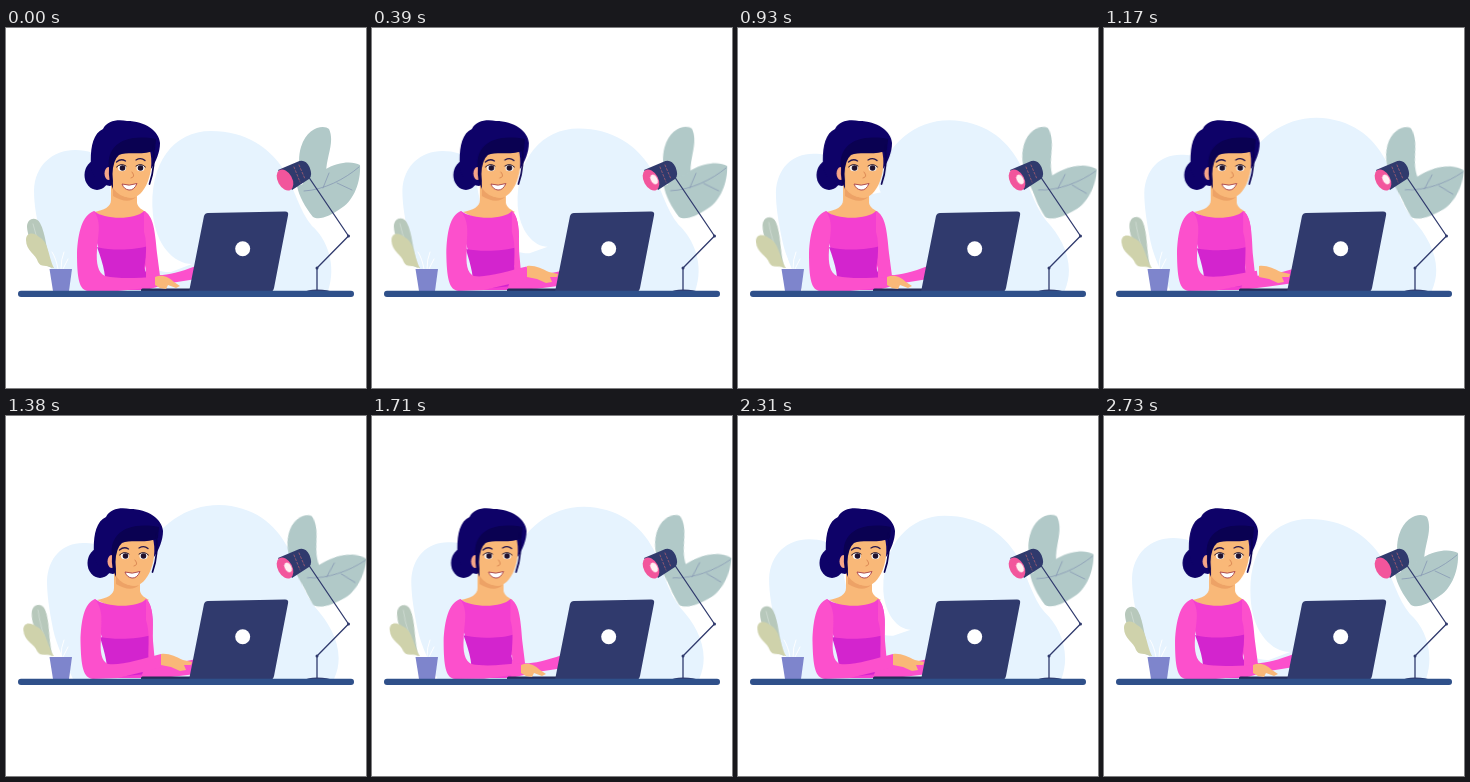
An HTML page that plays this animation: 360x360 px, repeating every 2.76 s.

```html
<!DOCTYPE html>
<html lang="en">
<head>
<meta charset="utf-8">
<title>Typing at a desk</title>
<style>
  html, body { margin: 0; width: 100%; height: 100%; overflow: hidden; background: #fff; }
  svg { display: block; width: 100vw; height: 100vh; }

  /* --b is the far pose of a path; plants and backdrop drift slowly, the woman types */
  .drift, .swing { animation: 1380ms cubic-bezier(.37, 0, .63, 1) infinite alternate; }
  .type, .nod { animation: 460ms cubic-bezier(.37, 0, .63, 1) infinite alternate; }
  .drift, .type { animation-name: morph; }
  .swing { animation-name: swing; }
  .nod { animation-name: nod; }
  .bulb { animation: glow 2760ms linear infinite; }
  @keyframes morph { to { d: var(--b); } }
  @keyframes swing { to { transform: rotate(var(--turn)); } }
  @keyframes nod { to { transform: translateX(3px); } }
  @keyframes glow { 0%, 4%, 98%, 100% { opacity: 0; } 12%, 88% { opacity: 1; } }

  .right { transform-origin: 310px 190px; }
  .left { transform-origin: 48px 243px; }
  .sky { fill: #e6f3fe; }
  .navy { fill: #303a6d; }
  .hair { fill: #0e0268; }
  .fringe { fill: #0a0152; }
  .skin { fill: #f9b878; }
  .sleeve { fill: #fc50cc; }
  .line { fill: none; stroke-linecap: round; stroke-linejoin: round; }
</style>
</head>
<body>
<svg viewBox="0 0 360 360">
  <path class="sky drift"
    d="M57 263C48 247 40 232 36 213C31 193 28 178 28 162C29 137 47 122 69 122C82 122 91 125 104 136C100 190 130 246 165 244L186 236C168 236 150 217 147 187C142 135 168 103 205 103C240 103 264 120 278 142C288 160 294 184 306 198C321 211 331 237 322 263L192 263L100 263Z"
    style="--b:path('M67 263C60 247 51 232 47 213C43 193 41 178 41 165C42 142 56 127 77 127C86 127 94 128 104 136C110 140 118 142 124 142L130 142C134 142 137 141 140 138C151 110 180 89 213 89C247 90 269 107 282 132C291 153 296 175 309 191C327 211 340 237 328 263L192 263L100 263Z')"/>

  <g class="swing right" style="--turn:-11deg">
    <path fill="#b1c9c8" d="M309 190C302 167 288 142 295 119C301 99 318 96 323 101C330 116 317 134 321 151Z"/>
  </g>
  <g class="swing right" style="--turn:7deg">
    <path fill="#b1c9c8" d="M291 158C301 156 308 148 318 142C333 133 347 133 354 137C355 155 347 174 334 181C325 187 314 193 307 189C299 179 293 168 291 158Z"/>
    <path class="line" stroke="#8799b4" stroke-width=".8" d="M298 163C318 162 339 151 353 139M317 160L323 145M331 155L346 162"/>
  </g>

  <g class="swing left" style="--turn:6deg">
    <path fill="#b7c8bb" d="M41 238C36 226 22 216 21 199C21 190 30 188 34 195C40 206 40 222 46 240Z"/>
    <path class="line" stroke="#d8e3dc" stroke-width=".6" d="M27 196Q32 217 44 238"/>
  </g>
  <g class="swing left" style="--turn:-5deg">
    <path fill="#cfd2ab" d="M47 240C40 236 35 240 32 234C30 226 20 223 20 212C20 204 28 204 33 209C43 214 42 228 48 240Z"/>
  </g>
  <path class="line" stroke="#fff" stroke-width=".9" d="M52 241Q50 230 46 224M55 241Q55 231 58 224M57 241L62 231"/>
  <path fill="#7e85cc" d="M43.500 241H66L63 263H47Z"/>

  <path class="line" stroke="#303a6d" stroke-width="1.300" d="M311 264V240L342.500 208L302 148"/>
  <circle class="navy" cx="311" cy="240" r="1.500"/>
  <circle class="navy" cx="342.500" cy="208" r="1.500"/>
  <path class="navy" d="M299 264Q301 261.500 311 261.500Q323 261.500 326 264Z"/>
  <path class="navy" d="M272 142L291 134Q299 130 303.500 139Q307 148 303 151L286 162Z"/>
  <path class="line" stroke="#9a5b70" stroke-width=".9" stroke-dasharray="2 2" d="M288 139L294 154M293 137L299 151"/>
  <g transform="rotate(-29 279 152)">
    <ellipse cx="279" cy="152" rx="7.200" ry="11.300" fill="#f2559c"/>
    <ellipse class="bulb" cx="282" cy="153" rx="3.300" ry="5.300" fill="#fff0f2"/>
  </g>

  <g class="nod">
    <ellipse class="hair" cx="91" cy="147" rx="12.500" ry="15"/>
    <path class="hair" d="M85 140C84 122 86 106 97 101C101 92 113 91 121 93C139 93 153 103 154 115C154 124 150 134 145 141L104 158Q89 156 85 140Z"/>
    <path class="skin" d="M105 153L131 163V175C132 180 137 182 140 184L115 197L88 184C98 182 105 179 105 172Z"/>
    <path fill="#eda266" d="M107 160Q115 172 130 169Q122 177 107 168Z"/>
    <ellipse cx="102.500" cy="145.500" rx="4" ry="6.500" fill="#f6a588"/>
    <path class="skin" d="M106 129C115 119 132 122 142 117C147 128 146 143 142 153C138 164 131 170 125 170C115 169 106 160 106 147Z"/>
    <path class="fringe" d="M103 140C100 118 118 105 150 111L149 122C139 128 122 123 113 127Q107 132 106.500 146Q107 154 107 161Q102 152 103 140Z"/>
    <path class="line" stroke="#0a0152" stroke-width="1.700" d="M147 117C149 131 147 146 143.500 156"/>
    <path class="line" stroke="#24164e" stroke-width="1.300" d="M110.500 134Q115 130 119.500 133M130 132Q135 129 139 132.500"/>
    <g fill="#fff">
      <ellipse cx="116" cy="140" rx="4" ry="3.300"/>
      <ellipse cx="134.500" cy="140" rx="4" ry="3.300"/>
    </g>
    <g fill="#21122d">
      <circle cx="116.500" cy="140" r="2.800"/>
      <circle cx="134.500" cy="140" r="2.800"/>
    </g>
    <path class="line" stroke="#21122d" d="M110.500 139Q115 134.500 120 138M130 138Q135 134.500 139.500 139"/>
    <path class="line" stroke="#dc8954" d="M126 144Q130 149 125 150"/>
    <path fill="#fff" stroke="#a8414a" stroke-width=".9" d="M116 156Q123 158.500 131 155.500Q128 162.500 123 162Q118 161.500 116 156Z"/>
  </g>

  <path class="type" fill="#f33fd0"
    d="M88 183C98 192 130 192 138 183C147 189 149 205 146 220L139 240L140 262L100 262C105 245 95 230 91 215L80 205Z"
    style="--b:path('M89 183C100 192 133 192 140 183C147 189 148 205 146 220L142 240L142 262L102 262C107 245 98 230 94 215L84 205Z')"/>
  <path class="type" fill="#d324ce"
    d="M91 219C106 223 130 222 142 218L138 240Q142 250 150 257L98 262C101 251 98 238 91 219Z"
    style="--b:path('M94 221C109 224 133 223 146 219L143 238Q144 250 150 257L100 262C103 251 99 238 94 221Z')"/>
  <path class="sleeve type"
    d="M138 183C147 187 149 201 151 225L154 248L141 249C137 235 143 219 138 204Z"
    style="--b:path('M140 183C146 187 147 201 147 225L149 247L143 249C141 235 145 219 140 204Z')"/>
  <path class="sleeve type"
    d="M140 244C150 250 166 247 190 238L190 251L165 255L140 262Z"
    style="--b:path('M140 246C150 250 166 248 190 243L190 258L165 261L135 262Z')"/>
  <path class="sleeve type"
    d="M88 183C76 187 72 205 71 225C71 250 73 262 82 263L112 263L151 259L150 249C130 250 112 251 99 248C92 245 90 235 91 222C92 205 96 195 88 183Z"
    style="--b:path('M89 183C78 187 75 205 74.500 225C75 250 77 262 87 263L112 262L157 251L155 238C135 243 115 250 102 248C95 245 94 235 95 222C95 205 98 195 89 183Z')"/>

  <rect x="135" y="260.500" width="52" height="4" rx="1.500" fill="#252c59"/>
  <path class="skin type"
    d="M149 249C156 246 163 249 168 254L174 258L170 260L162 257L160 261L154 260L149 257Z"
    style="--b:path('M155 238C163 237 170 241 177 244L186 246L185 249L178 249L180 254L174 255L165 251L155 249Z')"/>

  <path class="navy" d="M202 185L279 183.500Q283 183.500 282 187.500L268 260Q267 264 264 264H183L198 188Q199 185 202 185Z"/>
  <circle cx="236.700" cy="220.800" r="7.500" fill="#fff"/>
  <rect x="12" y="262.800" width="336" height="6.200" rx="3" fill="#2f508a"/>
</svg>
</body>
</html>
```
